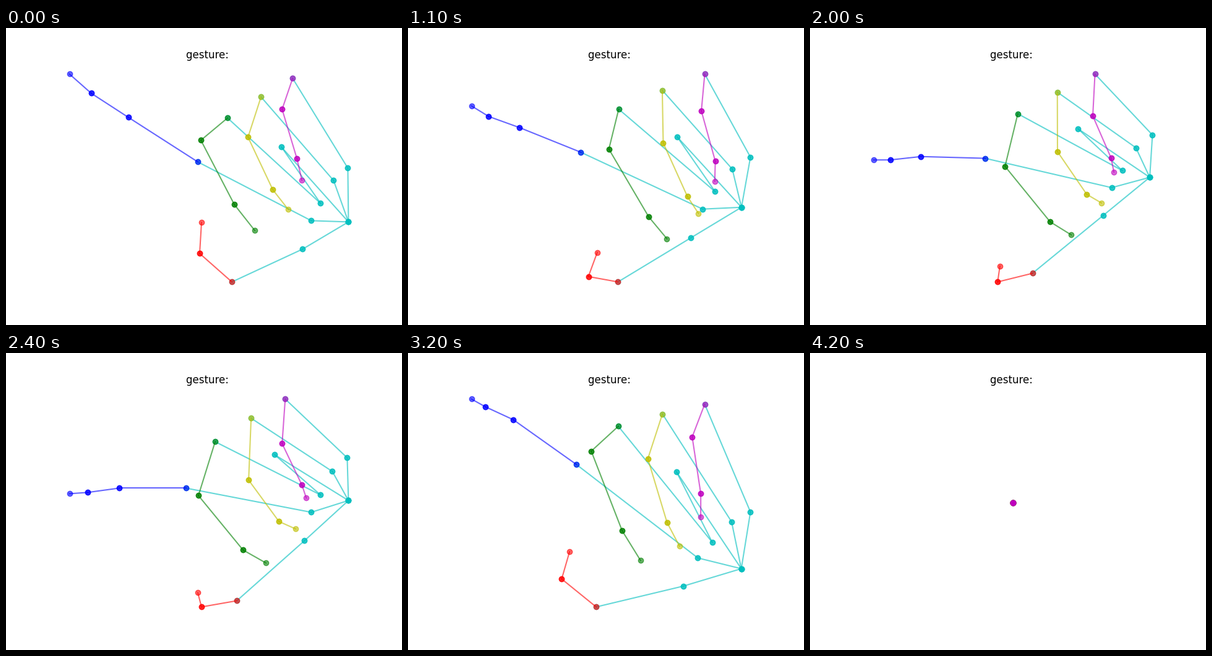
Recreate the animation shown at these times as a matplotlib script. Size 640x480 px, loop 9000 ms.

```python
import numpy as np
import matplotlib.pyplot as plt
from matplotlib.animation import FuncAnimation

STEP = 100       # ms per frame
FRAMES = 90
HAND_END = 4200  # the hand collapses to one point here


def pose(root, thumb, index, middle, ring, little):
    """Stack the joints of one hand as (26, 2), wrist and palm first."""
    return np.reshape(root + thumb + index + middle + ring + little, (-1, 2))


open_hand = pose(
    [553, 313, 445, 192],
    [479, 357, 365, 410, 313, 364, 316, 314],
    [493, 311, 310, 216, 198, 144, 138, 105, 103, 74],
    [508, 283, 358, 145, 315, 181, 369, 285, 402, 327],
    [529, 246, 412, 111, 391, 176, 431, 261, 456, 293],
    [552, 226, 463, 81, 446, 131, 470, 211, 478, 246])
tilting = pose(
    [544, 304, 442, 183],
    [467, 350, 357, 410, 313, 378, 320, 334],
    [484, 303, 297, 206, 192, 146, 136, 112, 103, 84],
    [502, 275, 352, 135, 328, 183, 386, 294, 417, 336],
    [527, 238, 415, 102, 410, 178, 448, 267, 468, 298],
    [553, 218, 477, 74, 468, 130, 491, 213, 492, 248])
level = pose(
    [540, 269, 431, 168],
    [458, 322, 335, 403, 281, 410, 296, 376],
    [476, 277, 273, 199, 175, 177, 128, 173, 103, 166],
    [496, 249, 334, 130, 317, 206, 386, 308, 416, 336],
    [523, 213, 405, 100, 406, 190, 448, 270, 467, 292],
    [553, 194, 473, 74, 468, 136, 492, 212, 493, 241])
lowered = pose(
    [553, 238, 434, 164],
    [482, 303, 373, 400, 316, 410, 310, 387],
    [493, 257, 291, 218, 183, 218, 132, 225, 103, 227],
    [508, 229, 338, 143, 311, 230, 383, 318, 420, 339],
    [527, 191, 396, 105, 392, 205, 441, 272, 468, 284],
    [551, 169, 451, 74, 446, 146, 478, 213, 485, 234])
rising = pose(
    [550, 289, 435, 175],
    [469, 339, 347, 410, 290, 396, 287, 362],
    [485, 292, 285, 201, 179, 165, 130, 157, 103, 150],
    [503, 264, 340, 130, 304, 199, 367, 309, 402, 344],
    [527, 227, 403, 99, 389, 191, 431, 276, 456, 302],
    [553, 207, 463, 74, 450, 141, 475, 221, 480, 251])
raised = pose(
    [531, 394, 434, 235],
    [431, 405, 281, 410, 227, 349, 252, 304],
    [459, 367, 267, 203, 168, 118, 124, 90, 103, 74],
    [485, 347, 342, 156, 294, 169, 335, 288, 361, 337],
    [520, 321, 417, 145, 388, 191, 412, 289, 429, 329],
    [553, 310, 489, 136, 465, 170, 472, 255, 469, 292])

times = np.array([0, 500, 1600, 2400, 2800, 3600, 4300])
poses = np.array([open_hand, tilting, level, lowered, rising, raised,
                  open_hand], float)
slopes = np.gradient(poses, times, axis=0)


def joints_at(t):
    """Cubic Hermite path through the key poses."""
    if t >= HAND_END:
        return np.zeros_like(poses[0])
    k = np.searchsorted(times, t, side="right") - 1
    h = times[k + 1] - times[k]
    u = (t - times[k]) / h
    return ((1 + 2 * u) * (1 - u) ** 2 * poses[k]
            + u * (1 - u) ** 2 * h * slopes[k]
            + u * u * (3 - 2 * u) * poses[k + 1]
            + u * u * (u - 1) * h * slopes[k + 1])


WRIST, PALM = 0, 1
fingers = [("r", 2, 4), ("b", 6, 5), ("g", 11, 5), ("y", 16, 5), ("m", 21, 5)]

bones = [(WRIST, PALM, "c")]
for color, first, _ in fingers:
    hub = PALM if color == "g" else WRIST
    bones += [(hub, first, "c"), (first, first + 1, "c")]
for color, first, count in fingers:
    bones += [(j, j + 1, color) for j in range(first + 1, first + count - 1)]

fig, ax = plt.subplots(figsize=(6.4, 4.8), dpi=100)
ax.axis("off")
ax.set_title("gesture: ")
lines = [ax.plot([], [], color=c, marker="o", alpha=0.6)[0]
         for _, _, c in bones]


def padded(v):
    lo, hi = v.min(), v.max()
    pad = 0.05 * (hi - lo) or 1
    return lo - pad, hi + pad


def draw(i):
    p = joints_at(i * STEP)
    for line, (a, b, _) in zip(lines, bones):
        line.set_data(p[[a, b], 0], p[[a, b], 1])
    ax.set_xlim(padded(p[:, 0]))
    ax.set_ylim(padded(p[:, 1])[::-1])
    return lines


anim = FuncAnimation(fig, draw, frames=FRAMES, interval=STEP,
                     repeat=True, repeat_delay=0, blit=False)
plt.show()
```
